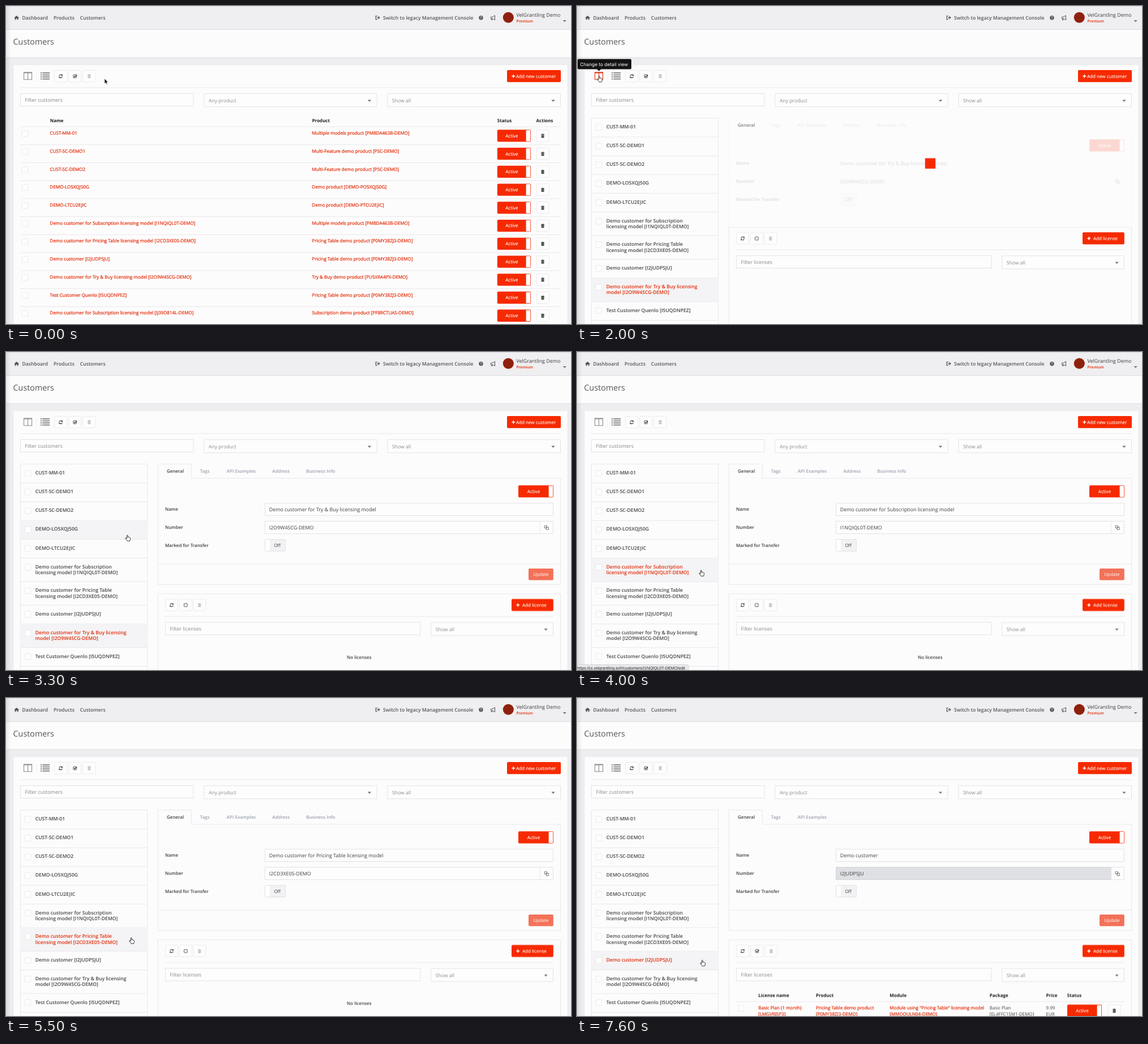
Write an HTML page that moves like this. It is 998 px wide and 561 px high and loops after 7800 ms.

```html
<!DOCTYPE html>
<html lang="en">
<head>
<meta charset="utf-8">
<title>Customers</title>
<style>
  html, body { margin: 0; width: 100%; height: 100%; overflow: hidden; background: #fdfcfd; }
  svg { display: block; width: 998px; height: 561px; }
  text { font: 7.98px "Open Sans", "Noto Sans", sans-serif; fill: #3c3c3e; text-rendering: geometricPrecision; white-space: pre; }
  .b { font-weight: 600; }
  .th { font-weight: 700; fill: #1c1c1e; }
  .nav { font-size: 8.65px; font-weight: 600; fill: #555557; }
  .item { font-size: 8.6px; font-weight: 600; fill: #444446; }
  .in { font-size: 8.87px; }
  .sel { font-size: 8.65px; fill: #8a8a8c; }
  .ph { fill: #858587; }
  .red { fill: #e22a04; }
  .link { font-size: 8.04px; fill: #e22a04; stroke: #e22a04; stroke-width: .22; }
  .w { fill: #fff; }
  .btn { font-size: 8.05px; fill: #fff; stroke: #fff; stroke-width: .12; }
  .tab { font-weight: 600; fill: #9aa1ae; }
  .mid { text-anchor: middle; }
  .box { fill: #fefdfe; stroke: #dcdbde; stroke-width: .8; }
  .soft { fill: #fefdfe; stroke: #e6e5e8; stroke-width: .8; }
  .line { fill: none; stroke: #e6e5e8; stroke-width: .9; }
  .hot { fill: #f62a00; }
</style>
</head>
<body>
<svg id="stage" viewBox="0 0 998 561" xmlns="http://www.w3.org/2000/svg"></svg>
<script>
const LOOP = 7800;
const DETAIL = 2000, READY = 2400, PICK_SUB = 4000, PICK_PRICE = 5500, PICK_DEMO = 6800, LICENSES = 7000;
const rules = [];
const pct = t => (Math.max(0, t - 4) / LOOP * 100).toFixed(3) + '%';

// Adds keyframes and returns the attribute that plays them.
function play(frames, timing = 'step-end') {
  const name = 'k' + rules.length;
  rules.push(`@keyframes ${name}{${frames.map(([t, css]) => `${pct(t)}{${css}}`).join('')}}`);
  return `style="animation:${name} ${LOOP}ms ${timing} infinite"`;
}
// Visible in each [from, to) pair of times.
function on(...times) {
  const frames = times[0] > 0 ? [[0, 'opacity:0']] : [];
  times.forEach((t, i) => frames.push([t, `opacity:${i % 2 ? 0 : 1}`]));
  return play(frames);
}

const text = (x, y, s, cls = '', attr = '') => `<text x="${x}" y="${y}" class="${cls}" ${attr}>${s}</text>`;
const rect = (x, y, w, h, cls, attr = '') => `<rect x="${x}" y="${y}" width="${w}" height="${h}" class="${cls}" ${attr}/>`;
const path = (d, attr) => `<path d="${d}" ${attr}/>`;
const line = (x1, x2, y) => path(`M${x1} ${y}H${x2}`, 'class="line"');
const group = (attr, ...parts) => `<g ${attr}>${parts.join('')}</g>`;
const at = (x, y, ...parts) => group(`transform="translate(${x} ${y})"`, ...parts);
const caret = (x, y) => path(`M${x - 3.2} ${y - 1.5}h6.4l-3.2 3.4z`, 'fill="#77777a"');
const check = (x, y) => rect(x, y, 10.5, 10.5, 'soft', 'rx="1"');
const field = (x, y, w, s, cls = 'in') => rect(x, y, w, 22, 'box') + text(x + 8, y + 14.3, s, cls);
const select = (x, y, w, s) => rect(x, y, w, 23, 'box') + text(x + 8, y + 15, s, 'sel') + caret(x + w - 13, y + 12.3);

const icons = {
  refresh: path('M-2.8-.7A2.9 2.9 0 0 1 2.2-1.7M2.8 .7A2.9 2.9 0 0 1-2.2 1.7', 'fill="none" stroke="#333" stroke-width="1.1"')
    + path('M3.3-3.4v2.7H.6zM-3.3 3.4V.7H-.6z', 'fill="#333"'),
  square: rect(-2.8, -2.8, 5.6, 5.6, '', 'rx="1" fill="none" stroke="#444" stroke-width=".9"'),
  trash: path('M-2.4-1.7h4.8v4.6q0 .5-.5.5h-3.8q-.5 0-.5-.5zM-3.1-2.8h6.2v.8h-6.2zM-1.2-3.6h2.4v.8h-2.4z', 'fill="#333"')
    + path('M-1-.8v3M1-.8v3', 'stroke="#fff" stroke-width=".5"'),
  copy: path('M-3.6-3.2h4v4h-4zM-.6-.6h4v4.4h-4z', 'fill="#fff" stroke="#555" stroke-width=".8"')
};
icons.tick = icons.square + path('M-1.6-.4L0 1.3 3.2-2.4', 'fill="none" stroke="#333" stroke-width="1.2"');

const button = (x, y, icon, faded) =>
  rect(x, y, 22, 20.5, 'soft', 'rx="1.5"') + group(`opacity="${faded ? .3 : 1}"`, at(x + 11, y + 10.5, icons[icon]));
const active = (x, y, w = 59.2) =>
  rect(x, y, w, 21.3, 'hot', 'rx="2"') + rect(x + w - 8.4, y + .8, 7.6, 19.7, 'w', 'rx="1.2"')
  + text(x + (w - 8) / 2, y + 13.5, 'Active', 'btn mid');
const add = (x, y, w, s) =>
  rect(x, y, w, 21.3, 'hot', 'rx="2"') + path(`M${x + 8.3} ${y + 10.8}h6M${x + 11.3} ${y + 7.8}v6`, 'stroke="#fff" stroke-width="1.5"')
  + text(x + (w > 80 ? 16 : 19), y + 13.6, s, 'btn');

function chrome() {
  return [
    rect(0, 0, 998, 42, '', 'fill="#efeef0"'), rect(0, 0, 998, 1, '', 'fill="#dddcdf"'),
    rect(0, 41, 998, 1, '', 'fill="#dddce0"'),
    rect(0, 90.5, 998, 471, '', 'fill="#eeedf0"'), rect(0, 90.5, 998, 1, '', 'fill="#e2e1e5"'),
    rect(13, 103.7, 979, 470, '', 'fill="#fdfcfd" stroke="#e6e5e8" stroke-width=".7"'),
    rect(0, 0, 9, 561, '', 'fill="url(#edge)"'),
    path('M14.4 20.8L18.7 17l4.3 3.8-.6.6-.7-.5v3.3h-2v-2.2h-2v2.2h-2v-3.3l-.7.5z', 'fill="#555"'),
    text(28.5, 23.8, 'Dashboard', 'nav'), text(84, 23.8, 'Products', 'nav'), text(130.8, 23.8, 'Customers', 'nav'),
    path('M655.6 17.6h-2.4v6h2.4M655 20.6h4.6M657.4 18.3l2.5 2.3-2.5 2.3', 'fill="none" stroke="#555" stroke-width="1.2"'),
    text(666, 23.8, 'Switch to legacy Management Console', 'nav'),
    '<circle cx="839" cy="20.7" r="3.7" fill="#555"/>', text(839, 23, '?', 'w mid b', 'style="font-size:6.5px"'),
    path('M856.4 19.4h2.5l4.6-2.7v8l-4.6-2.8h-.7l.8 2.7h-1.4l-.7-2.7h-.5z', 'fill="none" stroke="#555" stroke-width="1"'),
    '<circle cx="887.3" cy="20.3" r="9.5" fill="#8e210d"/>',
    text(901.5, 18.6, 'VelGrantling Demo', 'in'),
    text(901.5, 29.2, 'Premium', 'red b', 'style="font-size:6.65px"'), caret(986.7, 26.4),
    text(12.6, 68.4, 'Customers', '', 'style="font-size:14.3px;fill:#555558"')
  ].join('');
}

function columnsIcon(color) {
  return path('M31.6 117.4h14v12.4h-14zM38.6 117.4v12.4', `fill="none" stroke="${color}" stroke-width="1.1"`)
    + rect(31.1, 116.6, 15, 1.9, '', `fill="${color}"`);
}

function toolbar() {
  const bars = [0, 1, 2, 3].map(i => rect(61, 117 + i * 3.6, 2.2, 1.9, '', 'fill="#858588"')
    + rect(64.4, 117 + i * 3.6, 12.8, 1.9, '', 'fill="#858588"')).join('');
  return group(on(0, 1050, 2950, LOOP), columnsIcon('#8c8c8f')) + group(on(1050, 2950), columnsIcon('#e22a04')) + bars
    + path('M54 116v15', 'class="line" opacity=".6"')
    + button(85.7, 113.4, 'refresh') + button(110.7, 113.4, 'tick') + button(136, 113.4, 'trash', true)
    + add(885, 113, 95, 'Add new customer') + line(25, 980, 144)
    + field(25.4, 154.5, 305.5, 'Filter customers', 'in ph')
    + select(350, 154.8, 305, 'Any product') + select(674, 154.8, 305.5, 'Show all');
}

const multi = 'Multiple models product [PM8DA463B-DEMO]';
const pricing = 'Pricing Table demo product [P0MY38ZJ3-DEMO]';
const sub = 'Demo customer for Subscription licensing model';
const price = 'Demo customer for Pricing Table licensing model';
const tryBuy = 'Demo customer for Try &amp; Buy licensing model';
const customers = [
  ['CUST-MM-01', multi],
  ['CUST-SC-DEMO1', 'Multi-Feature demo product [PSC-DEMO]'],
  ['CUST-SC-DEMO2', 'Multi-Feature demo product [PSC-DEMO]'],
  ['DEMO-LO5XQJ50G', 'Demo product [DEMO-PO5XQJ50G]'],
  ['DEMO-LTCU2EJIC', 'Demo product [DEMO-PTCU2EJIC]'],
  [sub + ' [I1NQIQL0T-DEMO]', multi],
  [price + ' [I2CD3XE05-DEMO]', pricing],
  ['Demo customer [I2JUDPSJU]', pricing],
  [tryBuy + ' [I2O9W4SCG-DEMO]', 'Try &amp; Buy demo product [PU5XRA4PX-DEMO]'],
  ['Test Customer Quenlo [I5UQDNPEZ]', pricing],
  [sub + ' [IJ39D814L-DEMO]', 'Subscription demo product [PF8RCTUAS-DEMO]']
];

function table() {
  const heads = [[77.7, 'Name'], [540.7, 'Product'], [867.8, 'Status'], [936.6, 'Actions']]
    .map(([x, s]) => text(x, 205.1, s, 'th')).join('');
  const rows = customers.map(([name, product], i) => at(0, +(213 + i * 31.73).toFixed(2),
    line(25, 980, 0), check(28.3, 6.8), text(77.6, 14.1, name, 'link'), text(540.6, 14.1, product, 'link'),
    active(867.8, 5.3), button(937, 5.6, 'trash'))).join('');
  return group(on(0, DETAIL), heads, rows);
}

function sidebar() {
  const picked = { 8: [DETAIL, PICK_SUB], 5: [PICK_SUB, PICK_PRICE], 6: [PICK_PRICE, PICK_DEMO], 7: [PICK_DEMO, LOOP] };
  const hovered = { 2: [3180, 3240], 3: [3240, 3330], 4: [3330, 3450], 5: [3450, 4830], 6: [4830, 5950], 7: [5950, LOOP] };
  const breaks = { 5: 'Subscription ', 6: 'Table ', 8: 'licensing ' };
  let y = 198, out = '';
  customers.slice(0, 10).forEach(([name], i) => {
    const cut = breaks[i] ? name.indexOf(breaks[i]) + breaks[i].length : 0;
    const lines = cut ? [name.slice(0, cut).trim(), name.slice(cut)] : [name];
    const h = cut ? 41.6 : 33.1;
    const label = cls => lines.map((s, n) => text(51.8, y + 18.1 + n * 10.3, s, cls)).join('');
    const shade = attr => rect(25.5, y, 224, h, '', `fill="#f4f3f5" ${attr}`);
    if (hovered[i]) out += shade(on(...hovered[i]));
    out += check(33.2, y + 10.8) + label('item');
    if (picked[i]) out += group(on(...picked[i]), shade(''), check(33.2, y + 10.8), label('item red'));
    y += h;
    out += line(25, 250, y);
  });
  return rect(25.4, 197.7, 224.3, 400, 'line') + out;
}

function pane() {
  const tabs = [[342.8, 'Tags'], [389.8, 'API Examples']].map(([x, s]) => text(x, 213.4, s, 'tab')).join('')
    + group(on(0, PICK_DEMO), text(470.3, 213.4, 'Address', 'tab'), text(530.3, 213.4, 'Business Info', 'tab'));
  const values = [[DETAIL, PICK_SUB, tryBuy, 'I2O9W4SCG-DEMO'], [PICK_SUB, PICK_PRICE, sub, 'I1NQIQL0T-DEMO'],
    [PICK_PRICE, PICK_DEMO, price, 'I2CD3XE05-DEMO'], [PICK_DEMO, LOOP, 'Demo customer', 'I2JUDPSJU']]
    .map(([a, b, name, number]) => group(on(a, b), text(464.8, 281, name, 'in'), text(464.8, 312.8, number, 'in'))).join('');
  const fade = play([[0, 'opacity:.17'], [READY, 'opacity:.17'], [2700, 'opacity:1'], [LOOP + 4, 'opacity:1']], 'linear');
  const body = group(fade,
    path('M268.4 410.2V197.7H327.6V222.7H979.6V410.2', 'class="line"'),
    text(284, 213.4, 'General', 'b'), tabs, active(905, 235.3, 62),
    text(281, 280.2, 'Name', 'b'), text(281, 312, 'Number', 'b'), text(281, 343.8, 'Marked for Transfer', 'b'),
    group(on(READY, LOOP), rect(457.4, 266.8, 509.2, 21.8, 'box'), rect(457.4, 298.6, 509.2, 21.8, 'box')),
    rect(457.4, 298.6, 486, 21.8, '', `fill="#dfe0e4" stroke="#d3d3d8" stroke-width=".8" ${on(PICK_DEMO, LOOP)}`),
    path('M943.3 299v21', 'class="line"'), at(954.8, 309.6, icons.copy),
    rect(457.4, 330.6, 36.2, 20.6, '', 'rx="1.5" fill="#f2f1f3" stroke="#dcdbde" stroke-width=".8"'),
    rect(458, 331.2, 8, 19.4, 'w'), text(479.2, 343.7, 'Off', 'mid'), values,
    group(on(READY, LOOP), line(268, 980, 374), line(268, 980, 410.2),
      rect(923, 382, 43.8, 20.6, '', 'rx="2" fill="#f27259"'), text(944.9, 395.2, 'Update', 'w mid')));
  const spin = play([[0, 'transform:scale(1)'], [DETAIL, 'transform:scale(1)'], [2600, 'transform:scale(1,-1)'], [LOOP, 'transform:scale(1,-1)']], 'ease-in-out');
  return body + group(on(DETAIL, READY), text(284, 213.4, 'General', 'b', 'opacity=".55"'),
    at(624, 277.7, rect(-9.2, -9.2, 18.4, 18.4, 'hot', spin)));
}

function licenses() {
  const heads = [[320.3, 'License name'], [422, 'Product'], [552.3, 'Module'], [728.8, 'Package'], [828.6, 'Price'], [865.8, 'Status']]
    .map(([x, s]) => text(x, 527.6, s, 'th')).join('');
  const cells = [
    [320.3, 'Basic Plan (1 month)', '[LMGVRJSP3]', 'link'],
    [422, 'Pricing Table demo product', '[P0MY38ZJ3-DEMO]', 'link'],
    [552.3, 'Module using "Pricing Table" licensing model', '[MMOOULN04-DEMO]', 'link'],
    [728.8, 'Basic Plan', '[EL4FFC1SM1-DEMO]', ''], [828.6, '9.99', 'EUR', '']
  ].map(([x, a, b, cls]) => text(x, 549.8, a, cls) + text(x, 560.8, b, cls)).join('');
  const shift = play([[0, 'transform:translateY(-36.4px)'], [READY, 'transform:none'], [LOOP + 4, 'transform:none']]);
  return group(shift,
    rect(268.4, 426.6, 711.2, 200, 'line'), button(281.6, 436, 'refresh'),
    group(on(0, LICENSES), button(306.4, 436, 'square'), button(330.8, 436, 'trash', true)),
    group(on(LICENSES, LOOP), button(307, 436, 'tick'), button(332, 436, 'trash', true)),
    add(893, 435.6, 73.8, 'Add license'), line(281, 967, 466.6),
    field(281.4, 477, 450.4, 'Filter licenses', 'in ph'), select(750.8, 477.2, 215.8, 'Show all'),
    text(623.8, 541.4, 'No licenses', 'b mid', on(READY, LICENSES)),
    group(on(LICENSES, LOOP), heads, line(281, 967, 535.8), check(284.4, 542.2), cells, active(866, 541, 61), button(938, 541.2, 'trash')));
}

function overlays() {
  const tip = group(on(1150, 3000),
    path('M3 93.6H94q2 0 2 2v14q0 2-2 2H42.4l-3.6 3.2-3.6-3.2H3q-2 0-2-2v-14q0-2 2-2z', 'fill="#141314"'),
    text(5.6, 105.8, 'Change to detail view', 'w', 'style="font:8.3px Inter,sans-serif"'));
  const status = group(on(3800, 4900),
    path('M0 551.5H194q3 0 3 3V561H0z', 'fill="#e9e8ea" stroke="#c9c8cb" stroke-width=".7"'),
    text(.3, 559.6, 'https://ui.velgrantling.io/#/customers/I1NQIQL0T-DEMO/edit', '', 'style="font:7.2px \'Liberation Sans\',sans-serif;fill:#222"'));
  const stops = [
    [0, 174, 128, 'linear'], [500, 174, 128, 'ease-in-out'], [1250, 40, 123.7, 'linear'], [2880, 40, 123.7, 'ease-in'],
    [3300, 215, 322, 'ease-out'], [3800, 220, 385, 'linear'], [4500, 220, 385, 'ease-in'], [4800, 222, 403, 'ease-out'],
    [5150, 222, 423, 'linear'], [5750, 222, 423, 'ease-in-out'], [6200, 222, 462.5, 'linear'], [LOOP + 4, 222, 462.5, 'linear']
  ].map(([t, x, y, ease]) => [t, `transform:translate(${x}px,${y}px);animation-timing-function:${ease}`]);
  const arrow = path('M0 0v9.2l2.1-1.9 1.4 3.2 1.5-.7-1.4-3h2.9z', `fill="#111" stroke="#fff" stroke-width=".7" ${on(0, 680, 2950, 3160)}`);
  const hand = path('M-1.7 1a.95.95 0 0 1 1.9 0v3l.4-.7q1.1-.3 1.3.6 1.2-.4 1.4.6 1.3-.2 1.3 1l-.2 2.2-.9 2.6h-4.4l-.9-1.5-2.5-3q0-1.1 1.1-.9l1.5 1.2z',
    `fill="#fff" stroke="#111" stroke-width=".85" stroke-linejoin="round" ${on(680, 2950, 3160, LOOP)}`);
  return tip + status + group(play(stops, 'linear'), arrow, hand);
}

document.getElementById('stage').innerHTML =
  '<defs><linearGradient id="edge"><stop stop-color="#000" stop-opacity=".08"/><stop offset="1" stop-color="#000" stop-opacity="0"/></linearGradient></defs>'
  + chrome() + toolbar() + table()
  + group(on(DETAIL, LOOP), sidebar(), pane(), licenses()) + overlays();
const sheet = document.createElement('style');
sheet.textContent = rules.join('\n');
document.head.append(sheet);
</script>
</body>
</html>
```
